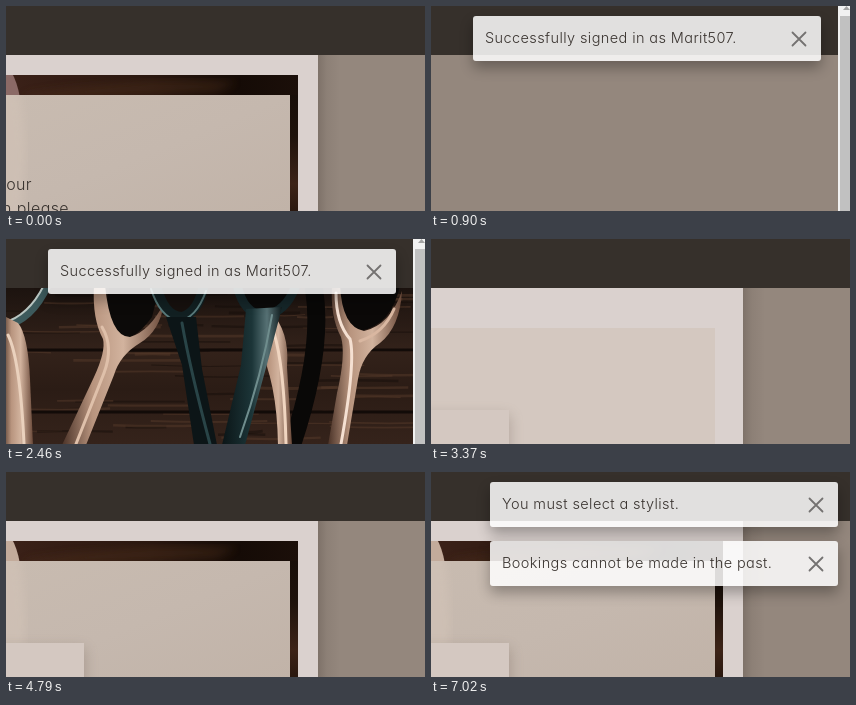
An HTML page for the animation above (8 s loop, 419 px wide and 205 px high).

```html
<!DOCTYPE html>
<html lang="en">
<head>
<meta charset="utf-8">
<title>Salon booking messages</title>
<style>
  html, body { margin: 0; width: 100%; height: 100%; overflow: hidden; background: #36302b; }
  svg { display: block; width: 100vw; height: 100vh; }
  text { fill: #39332f; font: 300 14.5px Inter, "Open Sans", sans-serif; letter-spacing: .4px; font-feature-settings: "cv11"; }
  text.plain { font: 14px "Liberation Sans", Arial, sans-serif; letter-spacing: 0; }
  text.copy { font-size: 16px; text-anchor: end; }
</style>
</head>
<body>
<svg viewBox="0 0 419 205">
  <defs>
    <filter id="soft" x="-20%" y="-50%" width="140%" height="220%"><feGaussianBlur stdDeviation="7"/></filter>
    <filter id="blur"><feGaussianBlur stdDeviation=".7"/></filter>
    <filter id="haze"><feGaussianBlur stdDeviation="4"/></filter>
    <linearGradient id="edge">
      <stop stop-color="#4a4039" stop-opacity=".3"/>
      <stop offset=".4" stop-color="#4a4039" stop-opacity=".1"/>
      <stop offset="1" stop-color="#4a4039" stop-opacity="0"/>
    </linearGradient>
    <linearGradient id="dark">
      <stop stop-color="#3b2118"/><stop offset=".5" stop-color="#2a170f"/><stop offset=".8" stop-color="#150b06"/><stop offset="1" stop-color="#1b0f09"/>
    </linearGradient>
    <linearGradient id="strip" x2="0" y2="1">
      <stop stop-color="#150c07"/><stop offset=".45" stop-color="#1e120b"/><stop offset=".8" stop-color="#3c2317"/><stop offset="1" stop-color="#2a180f"/>
    </linearGradient>
    <linearGradient id="panel" x2="1" y2="1">
      <stop stop-color="#c8bbb0"/><stop offset=".5" stop-color="#c5b8ae"/><stop offset="1" stop-color="#c1b3a8"/>
    </linearGradient>
    <linearGradient id="wood" x2="0" y2="1">
      <stop stop-color="#1c130f"/><stop offset=".4" stop-color="#33221a"/><stop offset=".65" stop-color="#2b1c15"/><stop offset="1" stop-color="#35231b"/>
    </linearGradient>
    <linearGradient id="copper">
      <stop stop-color="#4b3328"/><stop offset=".3" stop-color="#b8947e"/><stop offset=".6" stop-color="#d2b39e"/><stop offset="1" stop-color="#6b4a3a"/>
    </linearGradient>
    <linearGradient id="teal">
      <stop stop-color="#0b1517"/><stop offset=".5" stop-color="#1c3538"/><stop offset=".75" stop-color="#567174"/><stop offset="1" stop-color="#101b1d"/>
    </linearGradient>
    <clipPath id="below"><rect y="49" width="407" height="156"/></clipPath>
    <clipPath id="band"><rect y="69" width="292" height="20"/></clipPath>
    <clipPath id="sheet"><rect y="89" width="284" height="116"/></clipPath>
  </defs>
  <rect width="419" height="205" fill="#94877d"/>
  <rect width="419" height="49" fill="#36302b"/>

  <g id="tools" clip-path="url(#below)">
    <rect y="49" width="407" height="156" fill="url(#wood)"/>
    <g id="grain" filter="url(#blur)"></g>
    <g filter="url(#blur)" fill="none" stroke-linecap="round">
      <path d="M-4 88Q26 82 42 46" stroke="#3d5a5c" stroke-width="7"/>
      <path d="M-4 84Q22 78 38 46" stroke="#b9c6c2" stroke-width="2"/>
      <path d="M-4 76L12 84Q22 96 24 140L27 206H0L-4 130Z" fill="url(#copper)"/>
      <path d="M2 96Q14 120 18 205" stroke="#ead1bd" stroke-width="3"/>

      <path d="M104 46Q96 76 108 96Q124 108 146 78L154 46Z" fill="#0c0a09"/>
      <path d="M88 46Q86 80 97 100Q100 112 88 138L56 206H80L108 136Q114 116 134 104Q154 92 158 64Q144 92 124 98Q104 98 99 46Z" fill="url(#copper)"/>
      <path d="M96 88Q108 108 98 134L70 205" stroke="#dfc0aa" stroke-width="3"/>

      <path d="M150 46Q158 78 176 78Q192 74 198 46" fill="#17110e" stroke="#122022" stroke-width="10"/>
      <path d="M145 50Q154 78 172 82Q190 80 200 52" stroke="#58797a" stroke-width="2"/>
      <path d="M160 78L190 78L196 130L211 206H188L176 126Z" fill="#0c1517"/>
      <path d="M176 84Q184 130 204 205" stroke="#294447" stroke-width="3"/>

      <path d="M308 50Q318 110 286 206" stroke="#090807" stroke-width="18"/>
      <path d="M231 46Q238 76 258 76Q280 74 290 46" fill="#0b0a09" stroke="#16272a" stroke-width="9"/>
      <path d="M264 72Q284 92 281 128L286 206H272Q271 142 252 106Z" fill="url(#copper)"/>
      <path d="M268 94Q278 126 280 205" stroke="#f0d5c0" stroke-width="3"/>
      <path d="M240 70L276 68Q268 100 258 136L239 206H216L235 126Z" fill="url(#teal)"/>
      <path d="M266 76Q256 136 234 198" stroke="#6f8d8d" stroke-width="2"/>

      <path d="M331 46Q330 88 354 92Q386 86 394 46Z" fill="#0b0908"/>
      <path d="M326 46Q324 78 335 98Q340 116 331 154L322 206H341L352 140Q356 116 374 104Q394 88 396 52Q384 86 358 92Q336 88 334 46Z" fill="url(#copper)"/>
      <path d="M330 54Q330 84 344 100Q350 122 335 205" stroke="#f5e0d2" stroke-width="3"/>
      <path d="M354 102Q378 94 388 70" stroke="#d9b7a1" stroke-width="3"/>
    </g>
  </g>

  <g id="page">
    <rect x="312" y="49" width="22" height="156" fill="url(#edge)"/>
    <rect y="49" width="312" height="156" fill="#dad1ce"/>
    <rect id="blank" y="89" width="284" height="116" fill="#d4c8c0"/>
    <g id="photo">
      <rect y="69" width="292" height="136" fill="url(#strip)"/>
      <rect y="69" width="292" height="20" fill="url(#dark)"/>
      <g clip-path="url(#band)">
        <path d="M20 88Q130 70 230 76L210 86L20 94Z" fill="#50301f" opacity=".4" filter="url(#haze)"/>
        <path id="glow" d="M-5 64H4Q11 74 14 92H-5Z" filter="url(#blur)"/>
      </g>
      <rect y="89" width="284" height="116" fill="url(#panel)"/>
      <path d="M-9 80H12Q24 140 14 215H-9Z" fill="#d2c3b7" opacity=".65" filter="url(#haze)" clip-path="url(#sheet)"/>
    </g>
    <g id="copy">
      <text class="copy" x="26" y="184">your</text>
      <text class="copy" x="63" y="208">then please</text>
    </g>
    <g id="box">
      <rect x="-20" y="176" width="99" height="50" fill="#5a4a40" opacity=".28" filter="url(#soft)"/>
      <rect y="171" width="78" height="34" fill="#d4c8c1"/>
    </g>
  </g>

  <g id="bar">
    <rect x="407" width="12" height="205" fill="#f1f1f1"/>
    <rect x="409" y="10" width="10" height="195" fill="#c1c1c1"/>
    <path d="M412 4L415.500 0L419 4Z" fill="#a3a3a3"/>
  </g>
  <g id="toasts"></g>
</svg>
<script>
const LOOP = 8000;
const $ = id => document.getElementById(id);
const show = (id, on) => { $(id).style.display = on ? "" : "none"; };

// The shadow is cut out beneath the translucent body.
const toast = (id, x, y, label, style = "") => `<g id="${id}" transform="translate(${x} ${y})">
  <clipPath id="${id}-out"><path clip-rule="evenodd" d="M-40-30H390V100H-40ZM3 0H345Q348 0 348 3V42Q348 45 345 45H3Q0 45 0 42V3Q0 0 3 0Z"/></clipPath>
  <g clip-path="url(#${id}-out)"><rect y="7" width="348" height="45" rx="3" opacity=".3" filter="url(#soft)"/></g>
  <rect width="348" height="45" rx="3" fill="#fff" fill-opacity=".85"/>
  <text class="${style}" x="12" y="27">${label}</text>
  <path d="M319.500 16.500l13 13m0-13l-13 13" stroke="#747271" stroke-width="1.8" stroke-linecap="round"/></g>`;

const welcome = "Successfully signed in as Marit507.";
$("toasts").innerHTML =
  toast("plain", 42, 10, welcome, "plain") +
  toast("styled", 42, 10, welcome) +
  toast("stylist", 59, 10, "You must select a stylist.") +
  toast("past", 59, 69, "Bookings cannot be made in the past.");

let seed = 7;
const rand = () => (seed = seed * 16807 % 2147483647) / 2147483647;
let lines = "";
for (let i = 0; i < 70; i++) {
  const x = rand() * 400 - 30, y = 52 + rand() * 152, w = 30 + rand() * 90;
  lines += `<path d="M${x} ${y}q${w / 2} ${rand() * 5 - 2} ${w} 0" fill="none" stroke="${rand() < .5 ? "#170e0a" : "#573a2b"}" stroke-width="${1 + rand() * 2}" opacity=".5"/>`;
}
$("grain").innerHTML = lines + '<path d="M0 111H407M0 173H407" stroke="#120b08" stroke-width="3"/>';

function draw(t) {
  const within = (a, b) => t >= a && t < b;
  const signedIn = within(500, 3370);
  show("page", !signedIn);
  show("bar", signedIn);
  show("tools", within(1100, 3370));
  show("plain", within(500, 900));
  show("styled", within(900, 3370));
  show("photo", !within(3370, 3630));
  show("copy", t < 500);
  show("box", t >= 3370);
  show("stylist", t >= 5560);
  show("past", t >= 5560);
  $("glow").setAttribute("fill", t < 500 ? "#8b6a66" : "#c3ab9b");
}

const start = performance.now();
function tick(now) {
  draw(Math.max(0, now - start) % LOOP);
  requestAnimationFrame(tick);
}
draw(0);
requestAnimationFrame(tick);
</script>
</body>
</html>
```
